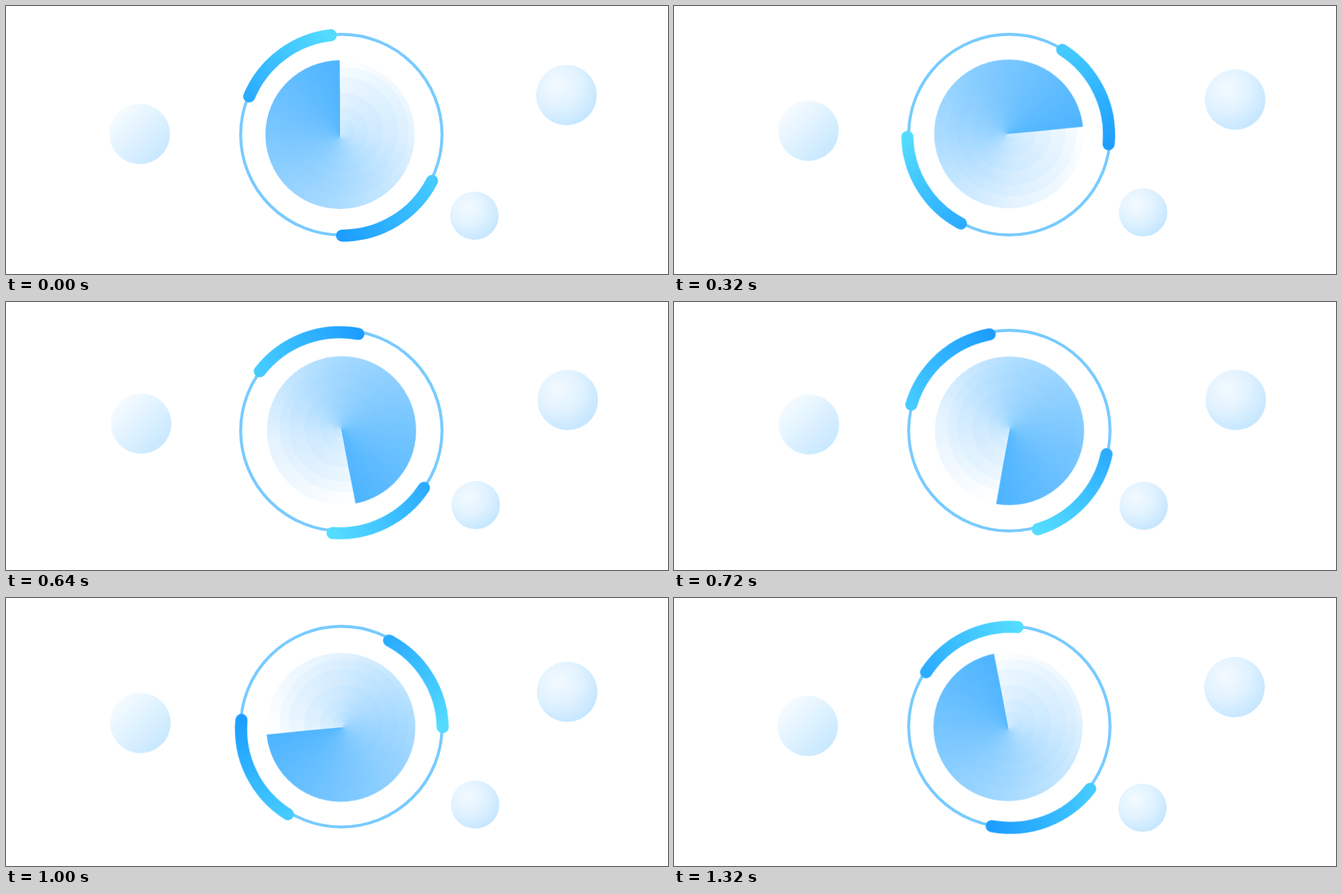
Write an HTML page that moves like this. It is 985 px wide and 400 px high and loops after 1360 ms.

```html
<!DOCTYPE html>
<html lang="en">
<head>
<meta charset="utf-8">
<title>Radar</title>
<style>
  html, body { margin: 0; width: 100%; height: 100%; overflow: hidden; background: #fff; }
  .stage { position: relative; width: 985px; height: 400px; overflow: hidden; }
  .stage > * { position: absolute; }
  svg { left: 0; top: 0; }

  /* the short negative delay keeps steps clear of tick boundaries */
  .sweep, .arcs, .ball { animation: 1360ms steps(34) -2ms infinite; }

  .sweep {
    left: 386.4px; top: 81px; width: 222px; height: 222px; border-radius: 50%;
    background: conic-gradient(from 0deg at 111px 114px,
      #fff, #e4f3ff 90deg, #acdcff 180deg, #7cc8ff 270deg, #4db4ff 359.5deg, #fff 360deg);
    transform-origin: 112.1px 111px;
    animation-name: turn;
  }
  .arcs { transform-origin: 498.5px 194.1px; animation-name: turn; animation-direction: reverse; }
  /* reversed steps need the jump at the start to hold the first pose */
  .arcs { animation-timing-function: steps(34, start); }

  .ball { border-radius: 50%; }
  .left {
    left: 153.5px; top: 146px; width: 90px; height: 90px; --rise: -9.5px;
    background: linear-gradient(135deg, #f7fcff 12%, #c5e7ff 90%);
    animation-name: early;
  }
  .right, .small {
    background: radial-gradient(circle at 35% 32%, #f3faff, #e2f3ff 38%, #c4e6ff 78%);
  }
  .right {
    left: 788.5px; top: 87.5px; width: 90px; height: 90px; --rise: 14.1px;
    animation-name: late;
  }
  .small {
    left: 660.5px; top: 277px; width: 72px; height: 72px; --rise: -10px;
    animation-name: early;
  }

  @keyframes turn { to { transform: rotate(360deg); } }
  @keyframes early {
    0% { transform: none; animation-timing-function: steps(16); }
    47.0588% { transform: translate(2px, var(--rise)); animation-timing-function: steps(17); }
    97.0588%, 100% { transform: none; }
  }
  @keyframes late {
    0% { transform: none; animation-timing-function: steps(17); }
    50% { transform: translate(2px, var(--rise)); animation-timing-function: steps(16); }
    97.0588%, 100% { transform: none; }
  }
</style>
</head>
<body>
<div class="stage">
  <div class="ball left"></div>
  <div class="ball right"></div>
  <div class="ball small"></div>
  <div class="sweep"></div>
  <svg width="985" height="400" fill="none">
    <defs>
      <linearGradient id="upper" gradientUnits="userSpaceOnUse" x1="483" y1="43" x2="362" y2="135">
        <stop stop-color="#54dcff"/><stop offset="1" stop-color="#2cacff"/>
      </linearGradient>
      <linearGradient id="lower" gradientUnits="userSpaceOnUse" x1="634" y1="261" x2="500" y2="343">
        <stop stop-color="#45cbff"/><stop offset="1" stop-color="#1d9eff"/>
      </linearGradient>
    </defs>
    <g fill="#6ec3ff" fill-opacity=".065">
      <circle cx="503" cy="187.5" r="96"/>
      <circle cx="502" cy="187" r="81"/>
      <circle cx="502.5" cy="188.5" r="58.5"/>
      <circle cx="503" cy="187.5" r="36"/>
      <circle cx="503" cy="187" r="17"/>
    </g>
    <circle cx="499" cy="192" r="149.8" stroke="#78cbff" stroke-width="4.4"/>
    <g class="arcs" stroke-width="18" stroke-linecap="round">
      <path stroke="url(#upper)" d="M483.2 43.6A150 150 0 0 0 361.9 135"/>
      <path stroke="url(#lower)" d="M633.9 261A150 150 0 0 1 500 342.65"/>
    </g>
  </svg>
</div>
</body>
</html>
```
